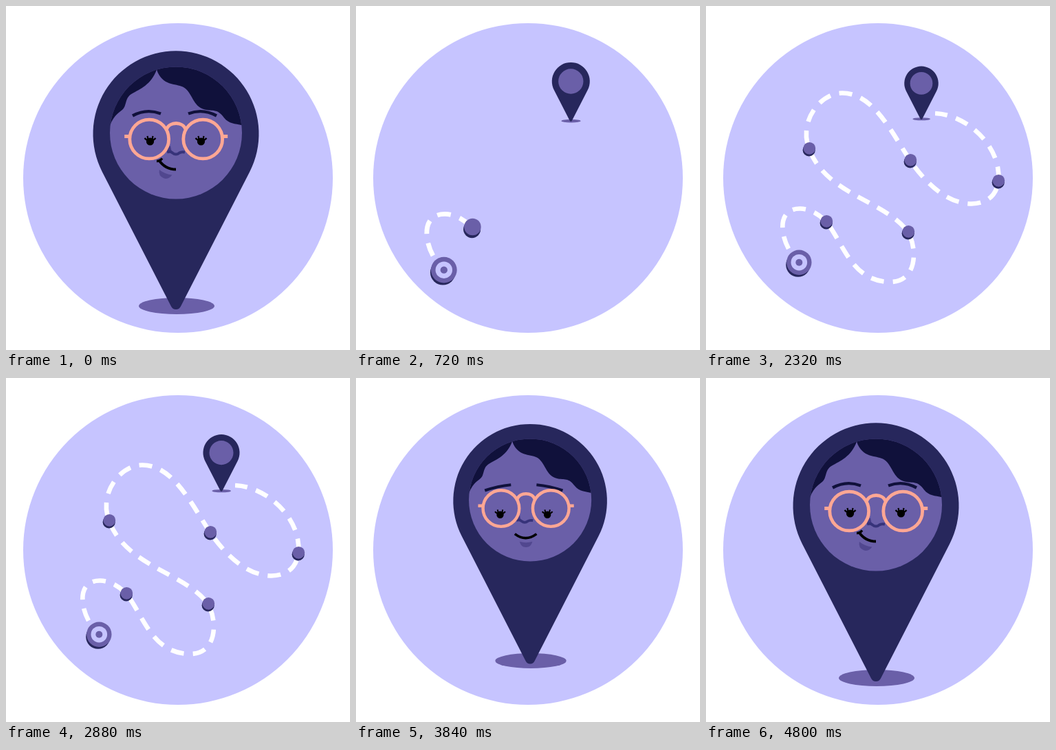
Write an HTML page that moves like this. It is 500 by 500 pixels and loops after 4.88 s.

```html
<!DOCTYPE html>
<html lang="en">
<head>
<meta charset="utf-8">
<title>Route pin</title>
<style>
  html, body { margin: 0; width: 100%; height: 100%; overflow: hidden; background: #fff; }
  svg { display: block; width: 100vw; height: 100vh; }
  .skin { fill: #6a5fa8; }
  .navy { fill: #27275c; }
  .pale { fill: #c6c4ff; }
  .hair { fill: #10113b; }
  .line { fill: none; }
</style>
</head>
<body>
<svg viewBox="0 0 500 500">
  <defs>
    <clipPath id="disc"><circle cx="250" cy="250" r="225"/></clipPath>
    <clipPath id="head"><circle r="96"/></clipPath>
    <mask id="drawn" maskUnits="userSpaceOnUse" x="0" y="0" width="500" height="500">
      <path id="reveal" class="line" stroke="#fff" stroke-width="12"/>
    </mask>
    <g id="eye">
      <circle r="5.6"/>
      <path class="line" stroke="#000" stroke-width="2.2" d="M-8-5Q-5-1 0-2Q5-1 8-5M-4-8L-3-3M4-8L3-3"/>
    </g>
    <path id="brow" class="line" stroke="#10113b" stroke-width="4.4"/>
    <g id="dot">
      <circle class="navy" cx="-.3" cy="1.4" r="9.1"/>
      <circle class="skin" cx=".3" cy="-1.2" r="8.9"/>
    </g>
  </defs>
  <circle class="pale" cx="250" cy="250" r="225"/>
  <g clip-path="url(#disc)">
    <g id="map">
      <g mask="url(#drawn)">
        <path id="route" class="line" stroke="#fff" stroke-width="6.6"/>
      </g>
      <g id="dots"></g>
      <g id="goal">
        <circle class="navy" cx="-1.5" cy="3.5" r="17.6"/>
        <circle class="skin" r="18.2"/>
        <circle class="pale" r="11.8"/>
        <circle class="skin" r="5"/>
      </g>
    </g>
  </g>
  <g id="pin">
    <ellipse id="shadow" class="skin" cx="1"/>
    <path class="navy" d="M-107.2 54.9A120.5 120.5 0 1 1 107.2 54.9L6.9 250.8A7.7 7.7 0 0 1-6.9 250.8Z"/>
    <g id="inner">
      <circle class="skin" r="96"/>
      <g id="face">
        <g class="hair" clip-path="url(#head)">
          <path d="M-28-92C-36-70-52-64-64-57C-76-50-70-38-80-32C-90-25-94-16-97-8L-110-110H-28Z"/>
          <path d="M-28-92C-20-68 0-72 10-67C24-60 24-38 42-34C54-31 60-36 70-22C78-12 88-14 100-10L110-110H-28Z"/>
        </g>
        <g id="brows"><use href="#brow"/><use href="#brow" transform="scale(-1 1)"/></g>
        <g id="nose">
          <path fill="#443c86" d="M-13-2Q-14-10-8-10Q-7-4-5 1Z"/>
          <path class="line" stroke="#37337a" stroke-width="4" d="M-13-1Q-8-3-5 0Q0 4 5 0Q8-2 13-1"/>
        </g>
        <g id="eyes"><use href="#eye" x="-37.5"/><use href="#eye" x="36.5"/></g>
        <g id="glasses" class="line" stroke="#ffa794" stroke-width="4.8">
          <circle cx="-39" r="28.4"/>
          <circle cx="39" r="28.4"/>
          <path d="M-14-14C-10-26 10-26 14-14M-67-4H-75M67-4H75"/>
        </g>
        <path id="mouth" class="line" stroke="#000" stroke-width="4"/>
        <path id="tick" class="line" stroke="#000" stroke-width="3.4" d="M-28 41Q-23 41-20 37"/>
        <path id="chin" fill="#51478f" d="M-10-3Q0 0 10-3Q8 6 0 6Q-8 6-10-3Z"/>
      </g>
    </g>
  </g>
</svg>
<script>
const LOOP = 4880, STEP = 80;
const SMALL = 0.22;                       // pin scale on the map
const HOME = [313, 108.7], NEAR = [247, 186];
const GOAL = [135.3, 372.7];
const ZOOM_OUT = 260, ZOOM_IN = 3520, ZOOM_TIME = 560;
const DRAW_FROM = 523, DRAW_TO = 2070;
const BEAT = 2050, TURN = 4080, TURN_TIME = 560;

const start = 'M129 366';
const curves = [
  '108 342 100 294 137 294.5', '152 295 165 303 175 314',
  '200 345 212 401 268 401', '306 401 308 355 294 329',
  '262 283 175 275 150 208', '134 168 166 126.5 198 126.5',
  '242 126.5 268 180 297 225', '322 261 352 287 386 287.5',
  '408 287 422 276 425 255', '430 205 380 158 333 156'
];
const stops = [2, 4, 5, 7, 9];            // curves that end at a dot

const $ = id => document.getElementById(id);
const lerp = (a, b, p) => a + (b - a) * p;
const mix = (a, b, p) => a.map((v, i) => lerp(v, b[i], p));
const clamp = v => Math.max(0, Math.min(1, v));
const smooth = u => u * u * (3 - 2 * u);
const set = (el, attrs) => { for (const k in attrs) el.setAttribute(k, attrs[k]); };
const place = (el, [x, y], s = 1, extra = '') =>
  set(el, { transform: `translate(${x} ${y}) scale(${s}) ${extra}` });

// steep ease with a slow start and a long soft end
function swoop(u) {
  const a = clamp(u) ** 3.75, b = .3 * clamp(1 - u) ** 3.75;
  return a / (a + b);
}

// 0 = map view, 1 = close-up
const closeness = t => t < 2000
  ? swoop(1 - (t - ZOOM_OUT) / ZOOM_TIME)
  : swoop((t - ZOOM_IN) / ZOOM_TIME);

// grows in before arrival, then relaxes from an oversize
const pop = t => clamp(t / 100 + 1) * (1 + .33 * Math.exp(-((Math.max(0, t) / 170) ** 2)));

// damped swing, one cycle every 400 ms
const beat = t => t < 0 ? 1 : 1 + .36 * Math.exp(-t / 170) * Math.sin(t * Math.PI / 200);

const svgNode = (name, attrs) => {
  const el = document.createElementNS('http://www.w3.org/2000/svg', name);
  set(el, attrs);
  return el;
};
const trail = n => start + curves.slice(0, n).map(c => 'C' + c).join('');
const lengthOf = n => svgNode('path', { d: trail(n) }).getTotalLength();

// whole dashes from the lead gap to the end of the route
const total = lengthOf(curves.length);
const lead = 16, dash = 19;
const period = (total - lead - dash) / Math.round((total - lead - dash) / 32);
set($('route'), {
  d: trail(curves.length),
  'stroke-dasharray': `${dash} ${period - dash}`,
  'stroke-dashoffset': period - lead
});
set($('reveal'), { d: trail(curves.length) });

const dots = stops.map(n => {
  const pos = curves[n - 1].split(' ').slice(-2).map(Number);
  const el = svgNode('use', { href: '#dot' });
  $('dots').append(el);
  return { el, pos, time: lerp(DRAW_FROM, DRAW_TO, lengthOf(n) / total) };
});

function drawMap(t, k, centre) {
  const s = k / SMALL;
  place($('map'), centre, s, `translate(${-HOME[0]} ${-HOME[1]})`);
  set($('map'), { opacity: clamp((2.2 - s) / .7) });
  const len = total * clamp((t - DRAW_FROM) / (DRAW_TO - DRAW_FROM));
  set($('reveal'), { 'stroke-dasharray': `${len} 3000`, visibility: len ? 'visible' : 'hidden' });
  for (const d of dots) place(d.el, d.pos, pop(t - d.time));
  place($('goal'), GOAL, clamp((t - 480) / 120));
}

// p: 0 looks down to the front, 1 is the turned smirk
function drawFace(p) {
  place($('glasses'), mix([-6.5, 13], [.2, 9], p));
  place($('eyes'), mix([-9.5, 23], [0, 12.5], p));
  place($('nose'), mix([-8.5, 33], [0, 29], p));
  place($('brows'), mix([-10, 0], [-2, 0], p));
  const [near, mid, far] = mix([-24, -22, -15], [-28, -36, -25], p);
  set($('brow'), { d: `M20 ${near}Q41 ${mid} 61 ${far}` });
  const m = mix([-24, 53, -7, 66, 10, 53], [-25, 39, -16, 53, 0, 53], p);
  set($('mouth'), { d: `M${m[0]} ${m[1]}Q${m.slice(2).join(' ')}` });
  set($('tick'), { opacity: clamp(p * 3 - 2) });
  place($('chin'), mix([-6.5, 68], [-16, 60], p), 1, `rotate(${22 * p})`);
}

function draw(t) {
  const near = closeness(t);
  const k = lerp(SMALL, 1, near);
  const centre = mix(HOME, NEAR, near);
  drawMap(t, k, centre);

  // the pulse grows from the tip
  const b = beat(t - BEAT);
  place($('pin'), [centre[0], centre[1] + 255 * k * (1 - b)], k * b);
  set($('shadow'), { cy: lerp(252, 250, near), rx: lerp(62, 55, near), ry: lerp(10, 12, near) });
  const shown = clamp((k - .26) / .4);
  place($('inner'), [0, -1.5 * shown], lerp(79.5, 96, shown) / 96);
  set($('face'), { opacity: shown });
  drawFace(t < 2000 ? 1 : smooth(clamp((t - TURN) / TURN_TIME)));
}

const begin = performance.now();
function tick(now) {
  const t = Math.max(0, now - begin) % LOOP;
  draw(Math.floor(t / STEP) * STEP);
  requestAnimationFrame(tick);
}
draw(0);
requestAnimationFrame(tick);
</script>
</body>
</html>
```
